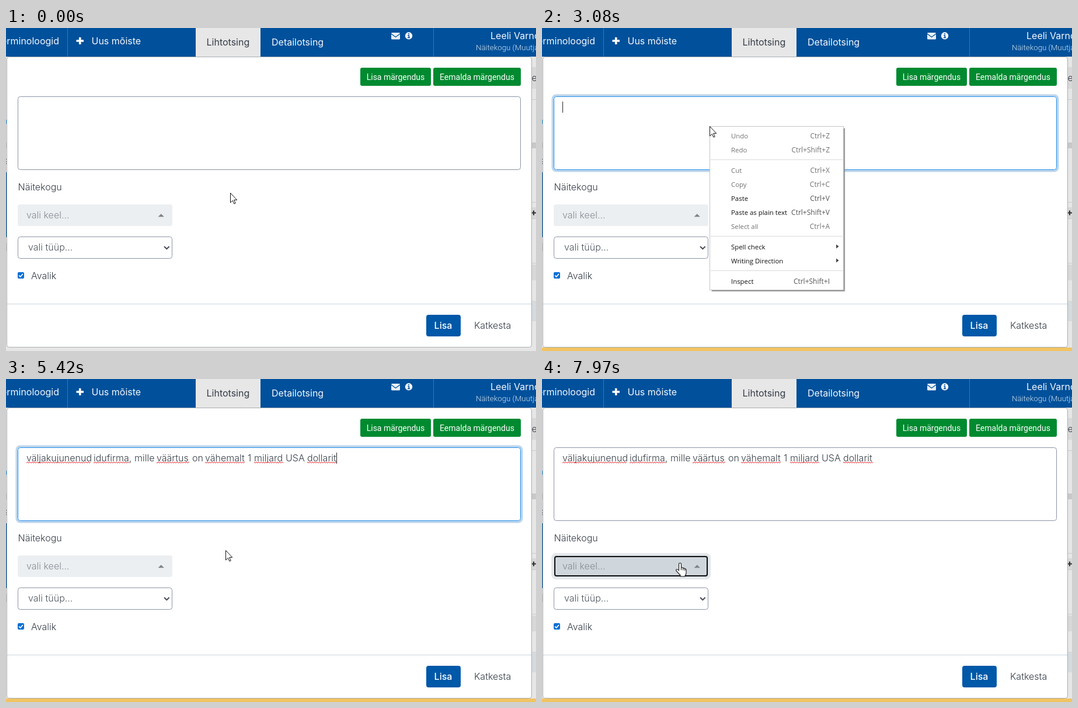
Animation of 908x553 px, one loop 8000 ms. Source, as an HTML page:

```html
<!DOCTYPE html>
<html lang="et">
<head>
<meta charset="utf-8">
<title>Definitsiooni lisamine</title>
<style>
  html, body { margin: 0; width: 100%; height: 100%; overflow: hidden; background: #e6e6e6; }
  svg { display: block; width: 100vw; height: 100vh; }
  text { font: 300 16px Inter, sans-serif; fill: #343c46; white-space: pre; }
  .head text { font-weight: 400; fill: #f4f8fc; }
  .head .sub { font: 300 13.3px Roboto, sans-serif; fill: #d5e2ef; }
  .tag text { font: 400 14px Roboto, sans-serif; fill: #fff; }
  .muted { fill: #858b92; }
  #menu text, #tip text { font: 400 11.4px "Open Sans", sans-serif; fill: #111; }
  #menu .key { font-size: 12px; text-anchor: end; fill: #555; }
  #menu .off { fill: #717171; }
  #tip text { fill: #575757; }
</style>
</head>
<body>
<svg viewBox="0 0 908 553">
  <defs>
    <pattern id="wave" x="35" y="141" width="4" height="4" patternUnits="userSpaceOnUse">
      <path d="M-1 2.5L0 3 2 1 4 3 5 2" fill="none" stroke="#e8262c"/>
    </pattern>
  </defs>

  <!-- dimmed page behind the dialog -->
  <rect width="908" height="553" fill="#e6e6e6"/>
  <g fill="#d8d8d8">
    <path d="M900 67h8v37h-8zM900 307h8v20h-8zM900 405h8v27h-8z"/>
    <path d="M900 467h8v35h-8z" fill="#d5dadd"/>
    <path d="M0 196h908v10H0z" fill="#c8c8c8"/>
    <path d="M900 122h8v1h-8zM900 298h8v1h-8zM900 326h8v1h-8zM900 402h8v1h-8z" fill="#cacaca"/>
    <path d="M0 247h3v111H0z" fill="#00509b"/>
    <path d="M0 157h2v7H0z" fill="#3aa0e0"/>
    <path d="M0 368h2v14H0z" fill="#c4c4c4"/>
  </g>
  <text x="900.5" y="91">e</text>
  <path d="M900 316.5h8M904 312.500v8" stroke="#333" stroke-width="2.2"/>
  <text x="-5" y="233">s</text>
  <rect id="bar" y="547" width="908" height="6" fill="#f1c362"/>

  <g class="head">
    <rect width="908" height="49" fill="#00509b"/>
    <path d="M105.500 0v49M732.500 0v49" stroke="#3a76b1"/>
    <rect x="325" width="111" height="49" fill="#e7e7e7"/>
    <text x="91" y="28" text-anchor="end">erminoloogid</text>
    <path d="M120.500 22h12.500M126.750 16v12" stroke="#fff" stroke-width="3.600"/>
    <text x="146.500" y="28">Uus mõiste</text>
    <text x="343.500" y="30" style="fill:#343c46">Lihtotsing</text>
    <text x="455" y="30">Detailotsing</text>
    <rect x="660" y="8" width="15" height="11.500" rx="1.500" fill="#e8eff6"/>
    <path d="M660 10l7.500 5.500L675 10" fill="none" stroke="#00509b" stroke-width="1.300"/>
    <circle cx="690" cy="13.300" r="6.200" fill="#f2f6fa"/>
    <path d="M689 9.700h2M688.300 12.500h2v4M688 16.500h4.200" fill="none" stroke="#00509b" stroke-width="1.500"/>
    <text x="830" y="19">Leeli Varnok</text>
    <text class="sub" x="805" y="38">Näitekogu (Muutja)</text>
  </g>

  <!-- dialog -->
  <rect x="1.500" y="49.500" width="899" height="497" rx="4" fill="#fff" stroke="#a9adb1"/>
  <g class="tag">
    <rect x="607" y="68" width="121" height="31" rx="3" fill="#008a30"/>
    <rect x="732" y="68" width="150" height="31" rx="3" fill="#008a30"/>
    <text x="667.500" y="89" text-anchor="middle">Lisa märgendus</text>
    <text x="807" y="89" text-anchor="middle">Eemalda märgendus</text>
  </g>
  <rect id="ring" x="18.300" y="115.300" width="865.400" height="129.400" rx="6" fill="none" stroke="#bcd5ec" stroke-width="3.600"/>
  <rect id="area" x="20.500" y="117.500" width="861" height="125" rx="4" fill="#fff"/>
  <g id="words"></g>
  <rect id="caret" y="126" width="1" height="19" fill="#222"/>

  <text x="20.500" y="278">Näitekogu</text>
  <g id="lang">
    <rect id="glow" x="18" y="300" width="269" height="41" rx="6" fill="none" stroke="#e4e8eb" stroke-width="4"/>
    <rect id="btn" x="20" y="302" width="265" height="37" rx="4"/>
    <rect id="edge" x="22" y="304" width="261" height="33" rx="3" fill="none" stroke="#101010" stroke-width="2"/>
    <text class="muted" x="35" y="326">vali keel...</text>
    <path d="M260.500 323.300l5.200-5 5.200 5z" fill="#7d8389"/>
  </g>
  <rect x="20.500" y="357.500" width="264" height="37" rx="4" fill="#fff" stroke="#8b95a7"/>
  <text x="38" y="381" style="fill:#4c535c">vali tüüp...</text>
  <path d="M271 374l4.300 4.300 4.300-4.300" fill="none" stroke="#4c4f5a" stroke-width="2"/>
  <rect x="20" y="418" width="11" height="11" rx="2" fill="#0a6fd6"/>
  <path d="M22.300 423.600l2.300 2.400 4.300-5" fill="none" stroke="#fff" stroke-width="1.700"/>
  <text x="43" y="430">Avalik</text>
  <path d="M2 472.500h898" stroke="#cdd6dd"/>
  <rect x="720" y="491" width="59" height="37" rx="4" fill="#0058a8"/>
  <text x="749" y="515" text-anchor="middle" style="fill:#fff;font-weight:500">Lisa</text>
  <text x="802" y="515">Katkesta</text>

  <g id="menu">
    <path d="M291 172h227.500v278.500H291z" fill="#8b8b8b"/>
    <path d="M290 171h229.500v280.500H290z" fill="#777" opacity=".25"/>
    <rect x="287.500" y="168.500" width="229" height="280" fill="#fff" stroke="#c4c4c4"/>
    <rect id="hot" x="288" y="279" width="228" height="24" fill="#c5c5c5"/>
    <path d="M289 225.500h226M289 356.500h226M289 415.500h226" stroke="#d9d9d9"/>
    <path d="M504 370.500l4.500 3.500-4.500 3.500zM504 394.500l4.500 3.500-4.500 3.500z" fill="#444"/>
  </g>

  <g id="tip">
    <rect x="246.500" y="332.500" width="66" height="23" fill="#000" opacity=".15"/>
    <rect x="245.500" y="330.500" width="65" height="22" fill="#fff" stroke="#767676"/>
    <text x="251" y="346">vali keel...</text>
  </g>

  <circle id="spot" r="12" fill="#ff0" opacity=".5"/>
  <g id="mouse" fill="#fff" stroke="#111" stroke-linejoin="round">
    <path id="arrow" d="M.5.5v16.500l3.900-3.600 2.500 5.600 2.300-1-2.500-5.600h5z"/>
    <path id="hand" d="M-1.500 13V2q0-2 2-2t2 2v6q3-.8 3.200 1 2.800-.6 3 1.200 2.300-.4 2.300 1.600v5q0 3-2 5v1.200h-8v-2q-3-3-7-7.600-1-2.200 1-2.700 1.400-.2 3.500 2.300zM2.500 8v4M5.700 9v3.500M8.700 10.200v3" stroke-width="1.100"/>
  </g>
</svg>

<script>
const LOOP = 8000;
const $ = id => document.getElementById(id);

function add(parent, tag, attrs, text) {
  const node = document.createElementNS('http://www.w3.org/2000/svg', tag);
  for (const key in attrs) node.setAttribute(key, attrs[key]);
  if (text) node.textContent = text;
  parent.append(node);
}

// text, left edge, width of the spelling mark
const words = [
  ['väljakujunenud', 35, 110], ['idufirma,', 150, 61], ['mille', 220, 0],
  ['väärtus', 258, 56], ['on', 319, 0], ['vähemalt', 341, 68], ['1', 414, 0],
  ['miljard', 425, 50], ['USA', 479, 0], ['dollarit', 516, 51]
];
for (const [word, x, mark] of words) {
  add($('words'), 'text', { x, y: 141 }, word);
  if (mark) add($('words'), 'rect', { x, y: 141, width: mark, height: 4, fill: 'url(#wave)' });
}

// label, shortcut, baseline, disabled
const items = [
  ['Undo', 'Ctrl+Z', 189, 1], ['Redo', 'Ctrl+Shift+Z', 213, 1],
  ['Cut', 'Ctrl+X', 248, 1], ['Copy', 'Ctrl+C', 272, 1],
  ['Paste', 'Ctrl+V', 296], ['Paste as plain text', 'Ctrl+Shift+V', 320],
  ['Select all', 'Ctrl+A', 344, 1], ['Spell check', '', 379],
  ['Writing Direction', '', 403], ['Inspect', 'Ctrl+Shift+I', 438]
];
for (const [label, key, y, off] of items) {
  add($('menu'), 'text', { x: 324, y, class: off ? 'off' : '' }, label);
  if (key) add($('menu'), 'text', { x: 493, y, class: off ? 'key off' : 'key' }, key);
}

// pointer moves: first step, last step, number of steps, end x, end y, easing
const smooth = p => p * p * (3 - 2 * p);
const linear = p => p;
const moves = [
  [50, 150, 2, 381, 279, linear], [310, 1080, 11, 291, 173, smooth],
  [1240, 1240, 1, 288, 170, linear], [1640, 1640, 1, 287, 168, linear],
  [3660, 4330, 10, 376, 291, smooth], [4490, 4490, 1, 376, 293, linear],
  [6360, 6650, 5, 291, 304, p => p * (.4 + .6 * p)],
  [6710, 6950, 4, 238, 317, p => p * (1.6 - .6 * p)],
  [7100, 7100, 1, 236, 316, linear], [7830, 7830, 1, 236, 315, linear]
];

function pointer(t) {
  let x = 384, y = 282;
  for (const [start, end, count, toX, toY, ease] of moves) {
    if (t < start) break;
    const gap = count > 1 ? (end - start) / (count - 1) : 1;
    const step = Math.min(count, Math.floor((t - start) / gap + 1e-6) + 1);
    const p = ease(step / count);
    x += (toX - x) * p;
    y += (toY - y) * p;
  }
  return [Math.round(x), Math.round(y)];
}

const within = (t, spans) => spans.some(([from, to]) => t >= from && t < to);
const clicks = [[1640, 1750], [2870, 3080], [5200, 5260], [7830, 7970]];
const carets = [
  [1750, 2160], [2720, 3250], [3770, 4300], [4790, 5840], [6360, 6880], [7350, 7900]
];
const show = (id, on) => $(id).setAttribute('visibility', on ? 'visible' : 'hidden');

function draw(t) {
  const [x, y] = pointer(t);
  const pasted = t >= 5310;
  const typing = within(t, [[1750, 7900]]);
  const chosen = t >= 7900;
  const menu = within(t, [[3080, 5310]]);
  const hover = t > 6360 && x < 285 && y >= 302;

  show('bar', t >= 1640);
  show('ring', typing);
  $('area').setAttribute('stroke', typing ? '#2690ee' : '#8b95a7');
  show('words', pasted);
  $('caret').setAttribute('x', pasted ? 566 : 35);
  show('caret', within(t, carets));

  show('menu', menu);
  show('hot', menu && y >= 279);
  show('glow', chosen);
  show('edge', chosen);
  $('btn').setAttribute('fill', t >= 7830 ? '#cfd7dd' : hover ? '#d5dde2' : '#eceff2');
  show('tip', within(t, [[7660, 7830]]));

  const place = `translate(${x} ${y})`;
  $('spot').setAttribute('transform', place);
  $('mouse').setAttribute('transform', place);
  show('spot', within(t, clicks));
  show('hand', hover);
  show('arrow', !hover);
}

const begin = performance.now();
function tick() {
  draw((performance.now() - begin) % LOOP);
  requestAnimationFrame(tick);
}
tick();
</script>
</body>
</html>
```
